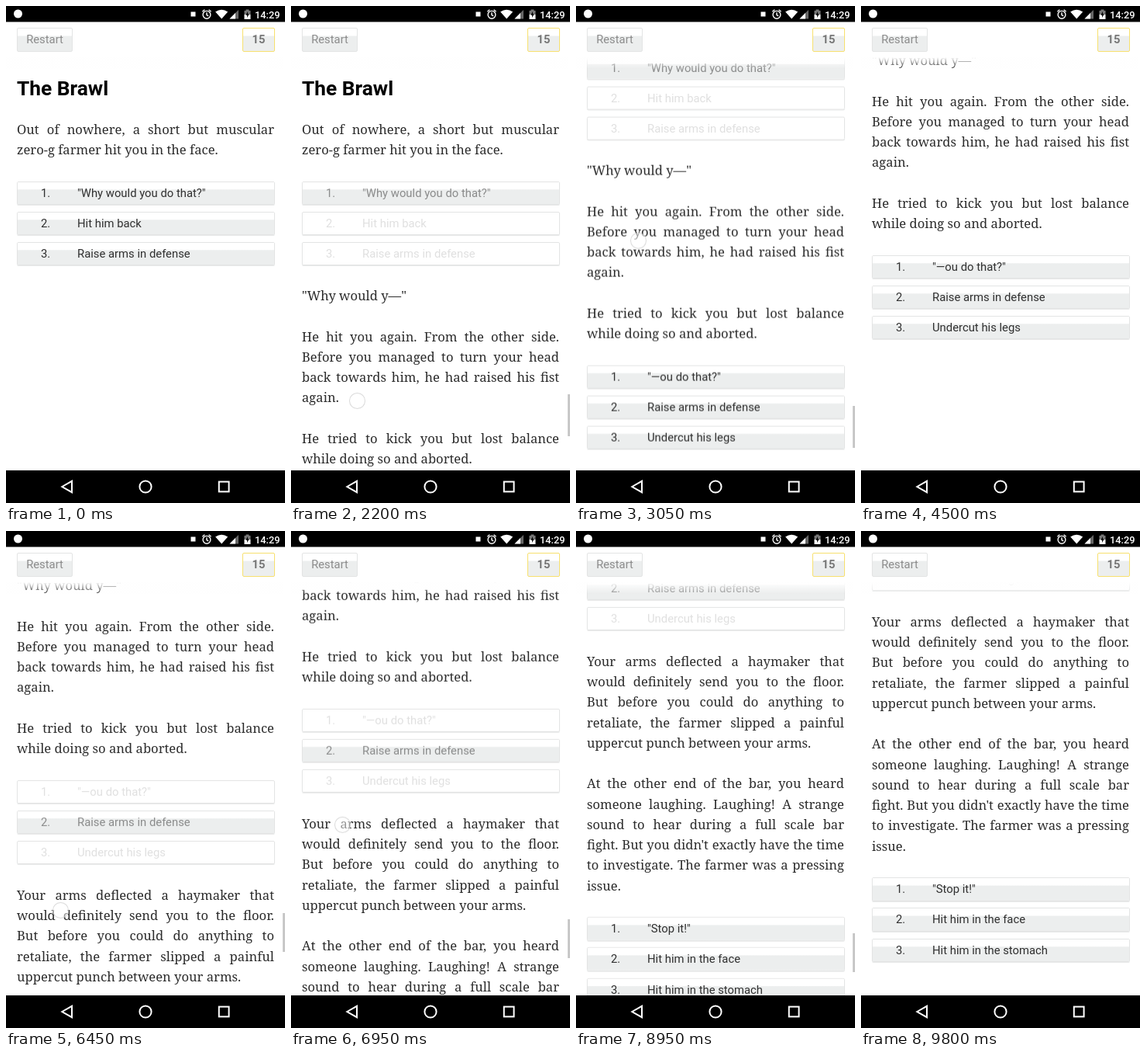
Write an HTML page that moves like this. It is 360x640 px and loops after 9850 ms.

```html
<!DOCTYPE html>
<html lang="en">
<head>
<meta charset="utf-8">
<title>The Brawl</title>
<style>
html, body { margin: 0; width: 100%; height: 100%; overflow: hidden; background: #fff; }
.stage { position: relative; width: 360px; height: 640px; overflow: hidden; background: #fff;
  font-family: Roboto, "Liberation Sans", sans-serif; --loop: 9850ms linear infinite; }
.stage > *, .story > *, .story p, .choices { position: absolute; }

/* story text */
.story { left: 0; top: 0; width: 360px; height: 1260px; animation: scroll var(--loop); }
.show1, .show2 { left: 0; top: 0; }
h1 { left: 14px; top: 90px; margin: 0; font: 700 26.3px/32px Roboto, sans-serif; color: #000; white-space: nowrap; }
p { left: 14px; width: 332px; margin: .6px 0 0; color: #2c2c2c;
  font: 16.63px/26.25px "Noto Serif", "Liberation Serif", serif; }
p span { display: block; white-space: nowrap; text-align: justify; text-align-last: justify; }
p span:last-child { text-align-last: left; }

/* choices */
.choices { left: 14px; width: 333px; }
.choice { position: relative; box-sizing: border-box; height: 30.5px; margin-bottom: 8.6px;
  border: 1px solid #e3e4e4; border-radius: 2px; box-shadow: 0 1px 0 #e8e9e9;
  font-size: 14.83px; line-height: 28.5px; color: #303030; white-space: nowrap; }
.choice::before { content: ""; position: absolute; inset: 0; }
.choice::before, .btn { background: linear-gradient(#fff 31%, #eceeee 35%); }
.choice b, .choice i { position: absolute; top: 0; font-weight: 400; font-style: normal; }
.choice b { left: 30px; }
.choice i { left: 77px; }

/* a tap settles one group of choices and reveals the next passage */
.tap1 .choice b, .tap1 .choice i, .tap1 .off::before, .show1 { animation: tap1 var(--loop); }
.tap2 .choice b, .tap2 .choice i, .tap2 .off::before, .show2 { animation: tap2 var(--loop); }
.show1, .show2 { --from: 0; --to: 1; }
.choice { --from: 1; --to: .52; }
.off { --to: .15; }
.off::before { --to: 0; }

@keyframes tap1 {
  0%, 8.6% { opacity: var(--from); }
  11.4%, 100% { opacity: var(--to); }
}
@keyframes tap2 {
  0%, 54.3% { opacity: var(--from); }
  56.8%, 100% { opacity: var(--to); }
}

@keyframes scroll {
  0% { transform: translateY(0); }
  22.335% { transform: translateY(0); animation-timing-function: cubic-bezier(.4, .05, .8, .58); }
  30.964% { transform: translateY(-161px); animation-timing-function: cubic-bezier(.3, .42, .6, 1); }
  36.041% { transform: translateY(-303px); }
  65.482% { transform: translateY(-303px); animation-timing-function: cubic-bezier(.3, .1, .7, .7); }
  70.558% { transform: translateY(-395px); animation-timing-function: cubic-bezier(.1, .42, .3, 1); }
  79.695% { transform: translateY(-438px); }
  85.279% { transform: translateY(-438px); animation-timing-function: ease-in; }
  86.802% { transform: translateY(-442px); animation-timing-function: cubic-bezier(.35, .1, .45, 1); }
  93.909%, 100% { transform: translateY(-655px); }
}

/* scroll thumb */
.thumb { right: 0; top: 500px; width: 3px; height: 54px; background: #c8c8c8;
  animation: thumb var(--loop), thumb-fade var(--loop); }
@keyframes thumb {
  0% { top: 500px; height: 54px; }
  22.335% { top: 500px; height: 54px; animation-timing-function: cubic-bezier(.4, .05, .8, .58); }
  30.964% { top: 515px; height: 54px; animation-timing-function: cubic-bezier(.3, .42, .6, 1); }
  36.041%, 54% { top: 528px; height: 54px; }
  54.01% { top: 492px; height: 50px; }
  65.482% { top: 492px; height: 50px; animation-timing-function: cubic-bezier(.3, .1, .7, .7); }
  70.558% { top: 500px; height: 50px; animation-timing-function: cubic-bezier(.1, .42, .3, 1); }
  79.695%, 85.279% { top: 503.7px; height: 50px; }
  86.802% { top: 504px; height: 50px; animation-timing-function: cubic-bezier(.35, .1, .45, 1); }
  93.909%, 100% { top: 522px; height: 50px; }
}
@keyframes thumb-fade {
  0%, 22.29% { opacity: 0; }
  22.3%, 39.086% { opacity: 1; }
  41.6%, 65.43% { opacity: 0; }
  65.44%, 81.218% { opacity: 1; }
  83.7%, 85.7% { opacity: 0; }
  85.71%, 96.954% { opacity: 1; }
  99.4%, 100% { opacity: 0; }
}

/* fingertip */
.finger { left: -10.5px; top: -10.5px; width: 21px; height: 21px; box-sizing: border-box; border-radius: 50%;
  border: 1.5px solid rgba(205, 205, 205, .75); background: rgba(255, 255, 255, .5);
  animation: touch var(--loop), drag var(--loop); }
@keyframes touch {
  0%, 7.59% { opacity: 0; }
  7.6%, 9.1% { opacity: 1; }
  9.11%, 22.29% { opacity: 0; }
  22.3%, 31.4% { opacity: 1; }
  31.9%, 53.27% { opacity: 0; }
  53.28%, 54.8% { opacity: 1; }
  54.81%, 65.45% { opacity: 0; }
  65.46%, 71% { opacity: 1; }
  71.5%, 85.25% { opacity: 0; }
  85.26%, 90.3% { opacity: 1; }
  90.8%, 100% { opacity: 0; }
}
@keyframes drag {
  0%, 12% { transform: translate(112px, 243px); }
  12.01% { transform: translate(85px, 508px); }
  22.335% { transform: translate(85px, 508px); animation-timing-function: cubic-bezier(.4, .15, .8, .65); }
  30.964% { transform: translate(80px, 302px); }
  32% { transform: translate(80px, 268px); }
  32.01%, 58% { transform: translate(98px, 377px); }
  58.01% { transform: translate(70px, 488px); }
  65.482% { transform: translate(70px, 488px); animation-timing-function: cubic-bezier(.3, .15, .7, .75); }
  70.558% { transform: translate(66px, 378px); }
  71.5% { transform: translate(66px, 361px); }
  71.51%, 85.279% { transform: translate(118px, 482px); }
  86.802% { transform: translate(117px, 470px); animation-timing-function: cubic-bezier(.45, .1, .75, .75); }
  90.8%, 100% { transform: translate(112px, 300px); }
}

/* fixed bars */
.head { left: 0; top: 20px; width: 357px; height: 61px; background: linear-gradient(#fff 46px, rgba(255, 255, 255, 0)); }
.btn { top: 28px; height: 31px; box-sizing: border-box; border: 1px solid #e3e4e4; border-radius: 2px;
  font-size: 14.8px; line-height: 28px; text-align: center; color: #8c8c8c; }
.restart { left: 14px; width: 72px; }
.score { left: 305px; width: 42px; border-color: #f7e06e; font-weight: 700; color: #777; }
.bars { left: 0; top: 0; }
</style>
</head>
<body>
<div class="stage">
  <div class="story">
    <h1>The Brawl</h1>
    <p style="top:145.5px"><span>Out of nowhere, a short but muscular</span><span>zero-g farmer hit you in the face.</span></p>
    <div class="choices tap1" style="top:225.5px">
      <div class="choice"><b>1.</b><i>"Why would you do that?"</i></div>
      <div class="choice off"><b>2.</b><i>Hit him back</i></div>
      <div class="choice off"><b>3.</b><i>Raise arms in defense</i></div>
    </div>

    <div class="show1">
      <p style="top:359.5px"><span>"Why would y—"</span></p>
      <p style="top:412px"><span>He hit you again. From the other side.</span><span>Before you managed to turn your head</span><span>back towards him, he had raised his fist</span><span>again.</span></p>
      <p style="top:543.4px"><span>He tried to kick you but lost balance</span><span>while doing so and aborted.</span></p>
      <div class="choices tap2" style="top:623.7px">
        <div class="choice off"><b>1.</b><i>"—ou do that?"</i></div>
        <div class="choice"><b>2.</b><i>Raise arms in defense</i></div>
        <div class="choice off"><b>3.</b><i>Undercut his legs</i></div>
      </div>
    </div>

    <div class="show2">
      <p style="top:758.4px"><span>Your arms deflected a haymaker that</span><span>would definitely send you to the floor.</span><span>But before you could do anything to</span><span>retaliate, the farmer slipped a painful</span><span>uppercut punch between your arms.</span></p>
      <p style="top:915.9px"><span>At the other end of the bar, you heard</span><span>someone laughing. Laughing! A strange</span><span>sound to hear during a full scale bar</span><span>fight. But you didn't exactly have the time</span><span>to investigate. The farmer was a pressing</span><span>issue.</span></p>
      <div class="choices" style="top:1101.4px">
        <div class="choice"><b>1.</b><i>"Stop it!"</i></div>
        <div class="choice"><b>2.</b><i>Hit him in the face</i></div>
        <div class="choice"><b>3.</b><i>Hit him in the stomach</i></div>
      </div>
    </div>
  </div>

  <div class="head"></div>
  <div class="btn restart">Restart</div>
  <div class="btn score">15</div>
  <div class="thumb"></div>
  <div class="finger"></div>

  <svg class="bars" width="360" height="640" fill="#fff">
    <path d="M0 0h360v20.500H0zM0 598h360v42H0z" fill="#000"/>
    <circle cx="15.5" cy="10" r="5.5"/>
    <rect x="238.5" y="7.5" width="6" height="6"/>
    <g fill="none" stroke="#fff" stroke-width="1.4">
      <circle cx="259" cy="11.3" r="4.9"/>
      <path d="M259 8.3v3.2l2.2 1.4M253.4 7.2l3-2.5M264.6 7.2l-3-2.5"/>
    </g>
    <path d="M270.2 7.6Q278.2 1.8 286.2 7.6L278.2 16.5Z"/>
    <path d="M300 5v11.5h-11.5z" fill="#666"/>
    <path d="M296 9v7.5h-7.5z"/>
    <path d="M307.5 6h2V4.5h4V6h2v5h-8z" fill="#777"/>
    <path d="M307.5 11h8v6h-8z"/>
    <path d="M312 7l-2.7 4.8h1.8V15l2.7-4.8H312z" fill="#000"/>
    <text x="321" y="15.5" font-size="12.8" font-weight="500" font-family="Roboto, sans-serif">14:29</text>
    <g fill="none" stroke="#fff" stroke-width="2">
      <path d="M72.3 619L85 611.8v14.4z"/>
      <circle cx="180" cy="619" r="7.6"/>
      <rect x="274.8" y="612.6" width="12.8" height="12.8"/>
    </g>
  </svg>
</div>
</body>
</html>
```
